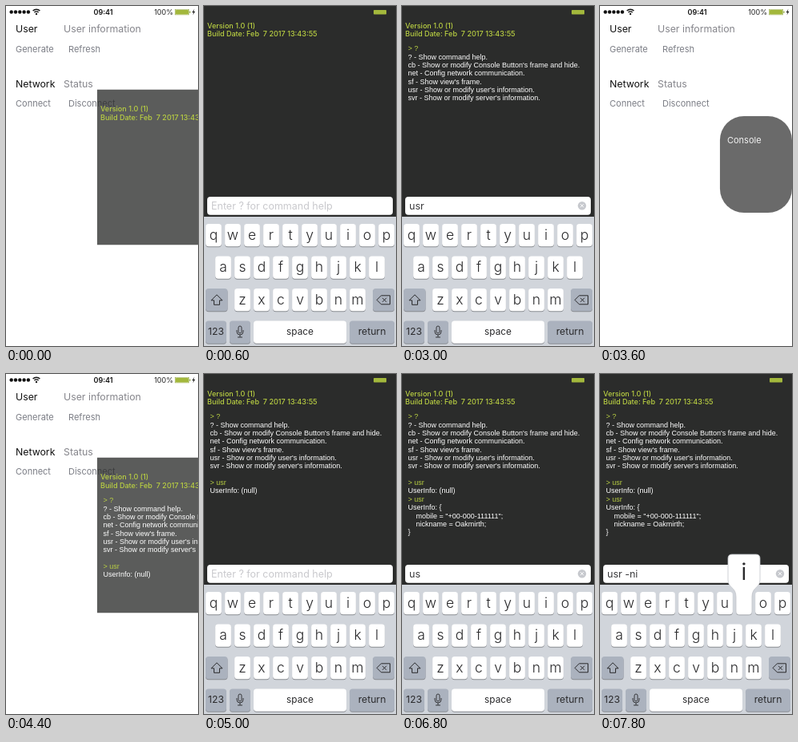
Write an HTML page with a canvas that moves like this. It is 240x426 px and loops after 8000 ms.

```html
<!DOCTYPE html>
<html lang="en">
<head>
<meta charset="utf-8">
<title>In-app console</title>
<style>
  html, body { margin: 0; width: 100%; height: 100%; overflow: hidden; background: #fff; }
  canvas { display: block; width: 100vw; height: 100vh; }
</style>
</head>
<body>
<canvas></canvas>
<script>
const W = 240, H = 426, LOOP = 8000, STEP = 200;
const UI = 'Inter, "Open Sans", sans-serif';
const LOG = '"Liberation Sans", Arial, sans-serif';
const LIME = '#b9cf42', DARK = '#2b2c2b', GREY = '#85858b', INK = '#2a2a2c';
const KEYBOARD_HEIGHT = 162;

const HEADER = ['Version 1.0 (1)', 'Build Date: Feb  7 2017 13:43:55'];
const OUTPUT = [
  '> ?',
  '? - Show command help.',
  "cb - Show or modify Console Button's frame and hide.",
  'net - Config network communication.',
  "sf - Show view's frame.",
  "usr - Show or modify user's information.",
  "svr - Show or modify server's information.",
  '',
  '> usr',
  'UserInfo: (null)',
  '> usr',
  'UserInfo: {',
  '    mobile = "+00-000-111111";',
  '    nickname = Oakmirth;',
  '}'
];

// Each cue changes part of the state and holds until the next one.
// open: 0 round button .. 1 full screen; keys: 0 hidden .. 1 raised.
const START = { open: 0.367, closing: false, keys: 0, page: 'abc', input: '', lines: 0, popup: '', pressed: '' };
const CUES = [
  [200, { open: 1 }],
  [400, { keys: 0.7 }],
  [600, { keys: 1 }],
  [800, { page: '123' }],
  [1000, { input: '?' }],
  [1400, { input: '', lines: 8 }],
  [1600, { keys: 0.235 }],
  [1800, { keys: 0 }],
  [2000, { keys: 0.7, page: 'abc' }],
  [2200, { keys: 1 }],
  [2400, { input: 'u' }],
  [2600, { input: 'us' }],
  [2800, { input: 'usr' }],
  [3200, { input: '', lines: 10, keys: 0.4 }],
  [3400, { keys: 0 }],
  [3600, { open: 0.167, closing: true }],
  [3800, { open: 0 }],
  [4000, { pressed: 'Generate' }],
  [4200, { pressed: '' }],
  [4400, { open: 0.367, closing: false }],
  [4600, { open: 1 }],
  [4800, { keys: 0.7 }],
  [5000, { keys: 1 }],
  [5200, { input: 'u' }],
  [5400, { input: 'us' }],
  [5600, { input: 'usr' }],
  [5800, { input: '', lines: 15, keys: 0.4 }],
  [6000, { keys: 0 }],
  [6200, { keys: 0.7 }],
  [6400, { keys: 1 }],
  [6600, { input: 'u' }],
  [6800, { input: 'us' }],
  [7000, { input: 'usr' }],
  [7200, { input: 'usr ', page: '123' }],
  [7400, { input: 'usr -' }],
  [7600, { input: 'usr -n', page: 'abc' }],
  [7800, { input: 'usr -ni', popup: 'i' }]
];

const canvas = document.querySelector('canvas');
const ctx = canvas.getContext('2d');

// y is the middle of the capital letters
function text(str, x, y, size, color, { align = 'left', font = UI, weight = 400 } = {}) {
  ctx.font = `${weight} ${size}px ${font}`;
  ctx.textAlign = align;
  ctx.fillStyle = color;
  ctx.fillText(str, x, y + size * 0.36);
}

function box(x, y, w, h, r, color) {
  ctx.beginPath();
  ctx.roundRect(x, y, w, h, r);
  ctx.fillStyle = color;
  ctx.fill();
}

function disc(x, y, r, color) {
  ctx.beginPath();
  ctx.arc(x, y, r, 0, 7);
  ctx.fillStyle = color;
  ctx.fill();
}

function icon(path, x, y, { fill, stroke, width = 1 }) {
  ctx.save();
  ctx.translate(x, y);
  const shape = new Path2D(path);
  if (fill) { ctx.fillStyle = fill; ctx.fill(shape); }
  if (stroke) { ctx.strokeStyle = stroke; ctx.lineWidth = width; ctx.stroke(shape); }
  ctx.restore();
}

function drawStatusBar() {
  for (let i = 0; i < 5; i++) disc(6.7 + i * 5.3, 7.5, 2.2, '#111');
  icon('M-4.4-1.2A6.3 6.3 0 0 1 4.4-1.2M-2.6 .8A3.7 3.7 0 0 1 2.6 .8', 38, 7.2, { stroke: '#111', width: 1.4 });
  disc(38, 10, 1.2, '#111');
  text('09:41', 121.5, 7.5, 9, '#111', { align: 'center', weight: 600 });
  text('100%', 209, 7.5, 9, '#222', { align: 'right' });
  ctx.strokeStyle = '#8fa63a';
  ctx.lineWidth = 0.6;
  ctx.strokeRect(211.3, 4.3, 17.4, 6.6);
  box(229.3, 6.3, 1.2, 2.6, 0.5, '#8fa63a');
  icon('M1-4L-2 .6H0L-1 4L2-.8H0Z', 234.5, 7.6, { fill: '#222' });
}

function drawPage({ pressed }) {
  ctx.fillStyle = '#fff';
  ctx.fillRect(0, 0, W, H);
  drawStatusBar();
  text('User', 12, 29, 12.3, '#111');
  text('User information', 72, 29, 12.3, GREY);
  text('Network', 12, 97.5, 12.3, '#111');
  text('Status', 72, 97.5, 12.3, GREY);
  const buttons = [['Generate', 12, 54.5], ['Refresh', 78, 54.5], ['Connect', 12, 122.5], ['Disconnect', 78, 122.5]];
  for (const [label, x, y] of buttons) text(label, x, y, 11, label === pressed ? '#d5d5d8' : '#7b7d85');
}

function drawInput(value, y) {
  box(4, y, 232, 22.8, 4, '#fff');
  text(value || 'Enter ? for command help', 9, y + 11.2, 12.5, value ? '#3a3a3c' : '#c9c9cd');
  if (!value) return;
  disc(225, y + 11.2, 5.2, '#c7c9ce');
  icon('M-2-2L2 2M2-2L-2 2', 225, y + 11.2, { stroke: '#fff' });
}

function key(x, y, w, label, { size = 17.5, color = '#fff', weight = 400 } = {}) {
  box(x, y + 1, w, 28.2, 3.7, '#898c91');
  box(x, y, w, 28.2, 3.7, color);
  text(label, x + w / 2, y + 13.4, size, INK, { align: 'center', weight });
}

function keyRow(labels, y, pitch = 24, width = 19.8) {
  const first = W / 2 - (labels.length - 1) * pitch / 2;
  [...labels].forEach((label, i) => key(first + i * pitch - width / 2, y, width, label, { weight: 300 }));
}

function drawKeyboard(page, top) {
  const dim = { size: 12.2, color: '#abb2be' };
  const letters = page === 'abc';
  const rows = [9, 49.5, 90, 130.5].map(y => top + y);
  ctx.fillStyle = '#d1d5db';
  ctx.fillRect(0, top, W, KEYBOARD_HEIGHT + 1);

  keyRow(letters ? 'qwertyuiop' : '1234567890', rows[0]);
  keyRow(letters ? 'asdfghjkl' : '-/:;()$&@"', rows[1]);
  if (letters) keyRow('zxcvbnm', rows[2]);
  else keyRow(".,?!'", rows[2], 33.5, 29);

  key(2, rows[2], 27.5, letters ? '' : '#+=', dim);
  if (letters) icon('M0-6.5L7 .5H3.5V6H-3.5V.5H-7Z', 16, rows[2] + 14.3, { stroke: INK });
  key(211, rows[2], 27, '', dim);
  icon('M-8.5 0L-3-5.5H8V5.5H-3ZM-1.5-2.5L3.5 2.5M3.5-2.5L-1.5 2.5', 224.5, rows[2] + 14.3, { stroke: INK });

  key(2, rows[3], 26, letters ? '123' : 'ABC', dim);
  key(32, rows[3], 26, '', dim);
  icon('M-2-5a2 2 0 0 1 4 0V0a2 2 0 0 1-4 0ZM-4-2V0a4 4 0 0 0 8 0V-2M0 4V7M-3 7H3', 45, rows[3] + 13.5, { stroke: INK, width: 0.9 });
  key(62, rows[3], 116, 'space', { size: 11.8 });
  key(182, rows[3], 56, 'return', dim);
}

function drawPopup(label) {
  const x = 12 + 24 * 'qwertyuiop'.indexOf(label);
  const bubble = 'M-15 226H15Q20 226 20 231V258C20 268 10 267 10 279V297Q10 301.5 6 301.5H-6' +
    'Q-10 301.5-10 297V279C-10 267-20 268-20 258V231Q-20 226-15 226Z';
  icon(bubble, x, 0, { fill: '#fff', stroke: '#c3c6cb', width: 0.8 });
  text(label, x, 247.5, 28, INK, { align: 'center' });
}

function drawConsole({ open, closing, keys, page, input, lines, popup }) {
  const left = 180 * (1 - open), top = 165.6 * (1 - open);
  const height = 60 + (H - 60) * open;
  const asButton = closing || open === 0;
  ctx.save();
  ctx.beginPath();
  ctx.roundRect(left, top, W - left, height, asButton ? 30 : 0);
  ctx.clip();
  ctx.globalAlpha = 0.64 + 0.36 * open;
  ctx.fillStyle = DARK;
  ctx.fillRect(0, 0, W, H);
  ctx.globalAlpha = 1;
  ctx.translate(left, top);

  if (asButton) {
    text('Console', 9, 30, 11, '#f2f2f2');
  } else {
    HEADER.forEach((line, i) => text(line, 4, 24.3 + i * 10.7, 9.05, LIME, { weight: 500 }));
    OUTPUT.slice(0, lines).forEach((line, i) =>
      text(line, 7.5, 53.1 + i * 10.35, 9, line[0] === '>' ? LIME : '#fff', { font: LOG }));
    const keyTop = H - KEYBOARD_HEIGHT * keys;
    drawInput(input, keyTop - 25);
    if (keys) drawKeyboard(page, keyTop);
    if (popup) drawPopup(popup);
  }
  ctx.restore();
}

function stateAt(time) {
  return CUES.reduce((state, [at, change]) => at <= time ? { ...state, ...change } : state, START);
}

function frame(now) {
  const time = Math.floor((now % LOOP) / STEP) * STEP;
  const state = stateAt(time);
  const width = Math.round(innerWidth * devicePixelRatio);
  const height = Math.round(innerHeight * devicePixelRatio);
  if (canvas.width !== width || canvas.height !== height) {
    canvas.width = width;
    canvas.height = height;
  }
  ctx.setTransform(width / W, 0, 0, height / H, 0, 0);
  drawPage(state);
  drawConsole(state);
  box(212, 5, 16, 5.5, 0.8, '#a3b83c');
}

const startTime = performance.now();
function tick() {
  frame(performance.now() - startTime);
  requestAnimationFrame(tick);
}
tick();
</script>
</body>
</html>
```
